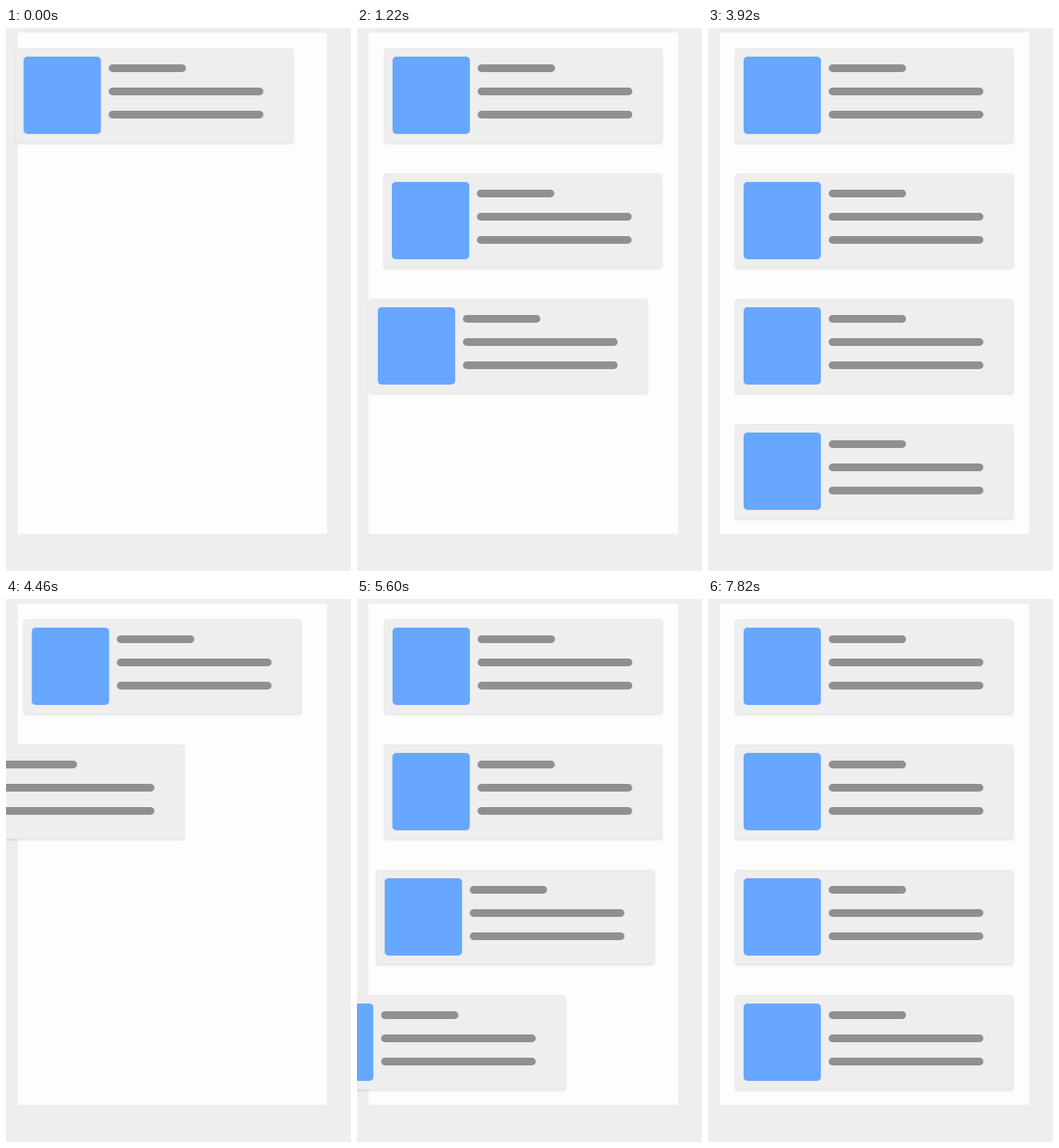
These frames come from a looping animation (446 px wide and 702 px high, 7840 ms). An HTML page:

```html
<!DOCTYPE html>
<html lang="en">
<head>
<meta charset="utf-8">
<title>Card list</title>
<style>
  html, body { margin: 0; width: 100%; height: 100%; overflow: hidden; background: #eeeeee; }
  .panel { position: absolute; left: 15px; top: 6px; width: 400px; height: 648px; background: #fdfdfd; }
  .card {
    position: absolute; left: 35px; top: calc(26px + 162px * var(--row));
    box-sizing: border-box; width: 360px; height: 122px;
    border: 1px solid #ebebed; border-radius: 3px; background: #eeeeee;
    box-shadow: 0 2px 3px rgba(0, 0, 20, .1);
  }
  .thumb { position: absolute; left: 10px; top: 10px; width: 100px; height: 100px; border-radius: 5px; background: #68a7ff; }
  .line { position: absolute; left: 120px; width: 200px; height: 10px; border-radius: 5px; background: #909090; }
  .line:nth-child(2) { top: 20px; width: 100px; }
  .line:nth-child(3) { top: 50px; }
  .line:nth-child(4) { top: 80px; }
</style>
</head>
<body>
<div class="panel"></div>
<script>
  const LOOP = 7840;
  // All counts below are in steps; three steps, held 100, 20 and 20 ms, take 140 ms.
  const SLIDE = 33.5;
  const STAGGER = 12;
  const FIRST_PASS = -11;
  const SECOND_PASS = 81;
  const RESET = 85;

  const slides = [0, 1, 2, 3].map(row => {
    const card = document.createElement('div');
    card.className = 'card';
    card.style.setProperty('--row', row);
    card.innerHTML = '<div class="thumb"></div>' + '<div class="line"></div>'.repeat(3);
    document.body.append(card);
    const slide = card.animate(
      { transform: ['translateX(-500px)', 'translateX(0)'] },
      { delay: row * STAGGER, duration: SLIDE, easing: 'cubic-bezier(0, 1, .15, 1)', fill: 'both' }
    );
    slide.pause();
    return slide;
  });

  function stepAt(t) {
    const rest = t % 140;
    return Math.floor(t / 140) * 3 + (rest < 100 ? 0 : rest < 120 ? 1 : 2);
  }

  const origin = performance.now();
  function draw() {
    const step = stepAt((performance.now() - origin) % LOOP);
    const start = step < RESET ? FIRST_PASS : SECOND_PASS;
    for (const slide of slides) slide.currentTime = step - start;
    requestAnimationFrame(draw);
  }
  draw();
</script>
</body>
</html>
```
